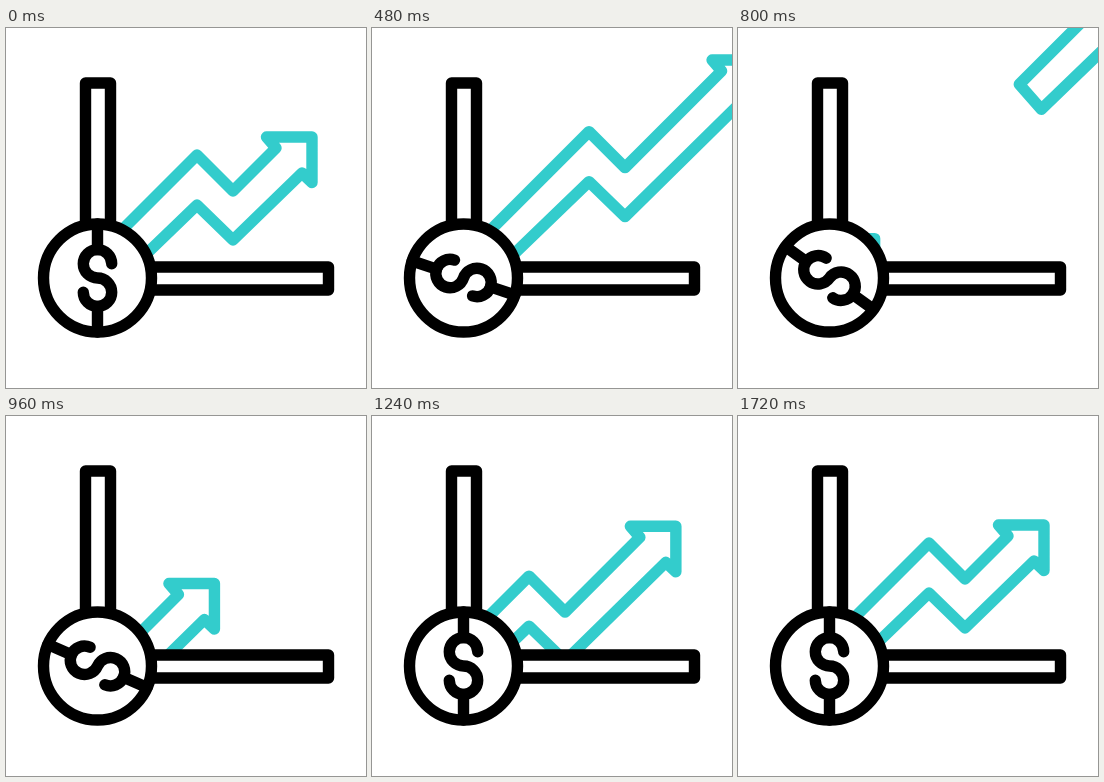
These frames come from a looping animation (360 px wide and 360 px high, 2080 ms). An HTML page with a canvas:

```html
<!DOCTYPE html>
<html lang="en">
<head>
<meta charset="utf-8">
<title>Rising profit</title>
<style>
  html, body { margin: 0; width: 100%; height: 100%; overflow: hidden; background: #fff; }
  canvas { display: block; width: 100vmin; height: 100vmin; }
</style>
</head>
<body>
<canvas id="stage"></canvas>
<script>
const SIZE = 360, LOOP = 2080, STEP = 40;
const TEAL = '#33cccc', INK = '#000', PAPER = '#fff';
const COIN = { x: 91.5, y: 250, r: 54 };

const canvas = document.getElementById('stage');
const ctx = canvas.getContext('2d');

const clamp = x => Math.min(1, Math.max(0, x));
const smooth = x => x * x * (3 - 2 * x);
const ease = (t, from, to) => smooth(clamp((t - from) / (to - from)));

// Smooth ease with a slightly slower start: cubic-bezier(.4, 0, .667, 1)
function slowStart(x) {
  let lo = 0, hi = 1;
  for (let i = 0; i < 24; i++) {
    const u = (lo + hi) / 2;
    if (1.2 * u - 0.4 * u * u + 0.2 * u ** 3 < x) lo = u; else hi = u;
  }
  return smooth(lo);
}

function strokePath(points, closed) {
  ctx.beginPath();
  points.forEach(([x, y]) => ctx.lineTo(x, y));
  if (closed) ctx.closePath();
  ctx.stroke();
}

const shift = (points, [dx, dy]) => points.map(([x, y]) => [x + dx, y + dy]);

// Outline in three parts that move separately: tail, bend and head
function drawArrow(tail, bend, head) {
  strokePath([
    ...shift([[85, 233]], tail),
    ...shift([[191, 127], [227, 163]], bend),
    ...shift([[270, 120], [260.5, 109], [306, 109], [306, 154.5], [296, 145]], head),
    ...shift([[227, 212], [191, 177]], bend),
    ...shift([[107, 258]], tail)
  ], true);
}

function drawLeaving(t) {
  const g = 26 * (Math.max(0, t - 320) / 160) ** 1.84;
  const reach = 54.5 * ease(t, 0, 520);
  const body = [g, -0.9 * g];
  drawArrow(body, body, [body[0] + reach, body[1] - reach]);
}

function drawArriving(t) {
  const left = 214 * (1 - ease(t, 600, 1280));
  const lag = 43 * (1 - ease(t, 1000, 1720));
  const head = [-left, 0.6 * left];
  const body = [head[0] - lag, head[1] + lag];
  drawArrow(body, body, head);
}

function drawArrows(t) {
  ctx.save();
  ctx.beginPath();
  ctx.rect(105, 0, SIZE - 105, 239);
  ctx.clip();
  ctx.strokeStyle = TEAL;
  if (t < 1000) drawLeaving(t);
  if (t >= 600) drawArriving(t);
  ctx.restore();
}

function drawAxes() {
  strokePath([[79.5, 200], [79.5, 55], [104.5, 55], [104.5, 200]]);
  strokePath([[140, 239], [322.5, 239], [322.5, 262], [140, 262]]);
}

function drawCoin(t) {
  ctx.save();
  ctx.translate(COIN.x, COIN.y);
  ctx.beginPath();
  ctx.arc(0, 0, COIN.r, 0, 2 * Math.PI);
  ctx.fillStyle = PAPER;
  ctx.fill();
  ctx.stroke();

  ctx.rotate(4 * Math.PI * slowStart(clamp((t - 240) / 880)));
  const r = 14.2;
  ctx.beginPath();
  ctx.arc(0, -r, r, 0, Math.PI / 2, true);
  ctx.arc(0, r, r, -Math.PI / 2, Math.PI);
  ctx.stroke();
  strokePath([[0, -COIN.r], [0, -2 * r]]);
  strokePath([[0, 2 * r], [0, COIN.r]]);
  ctx.restore();
}

function draw(t) {
  const side = Math.round(Math.min(innerWidth, innerHeight) * devicePixelRatio);
  if (canvas.width !== side) canvas.width = canvas.height = side;
  ctx.setTransform(side / SIZE, 0, 0, side / SIZE, 0, 0);
  ctx.fillStyle = PAPER;
  ctx.fillRect(0, 0, SIZE, SIZE);
  ctx.lineWidth = 11.4;
  ctx.lineCap = ctx.lineJoin = 'round';
  ctx.strokeStyle = INK;
  drawArrows(t);
  drawAxes();
  drawCoin(t);
}

const start = performance.now();
function tick() {
  const t = (performance.now() - start) % LOOP;
  draw(Math.floor(t / STEP) * STEP);
  requestAnimationFrame(tick);
}
tick();
</script>
</body>
</html>
```
